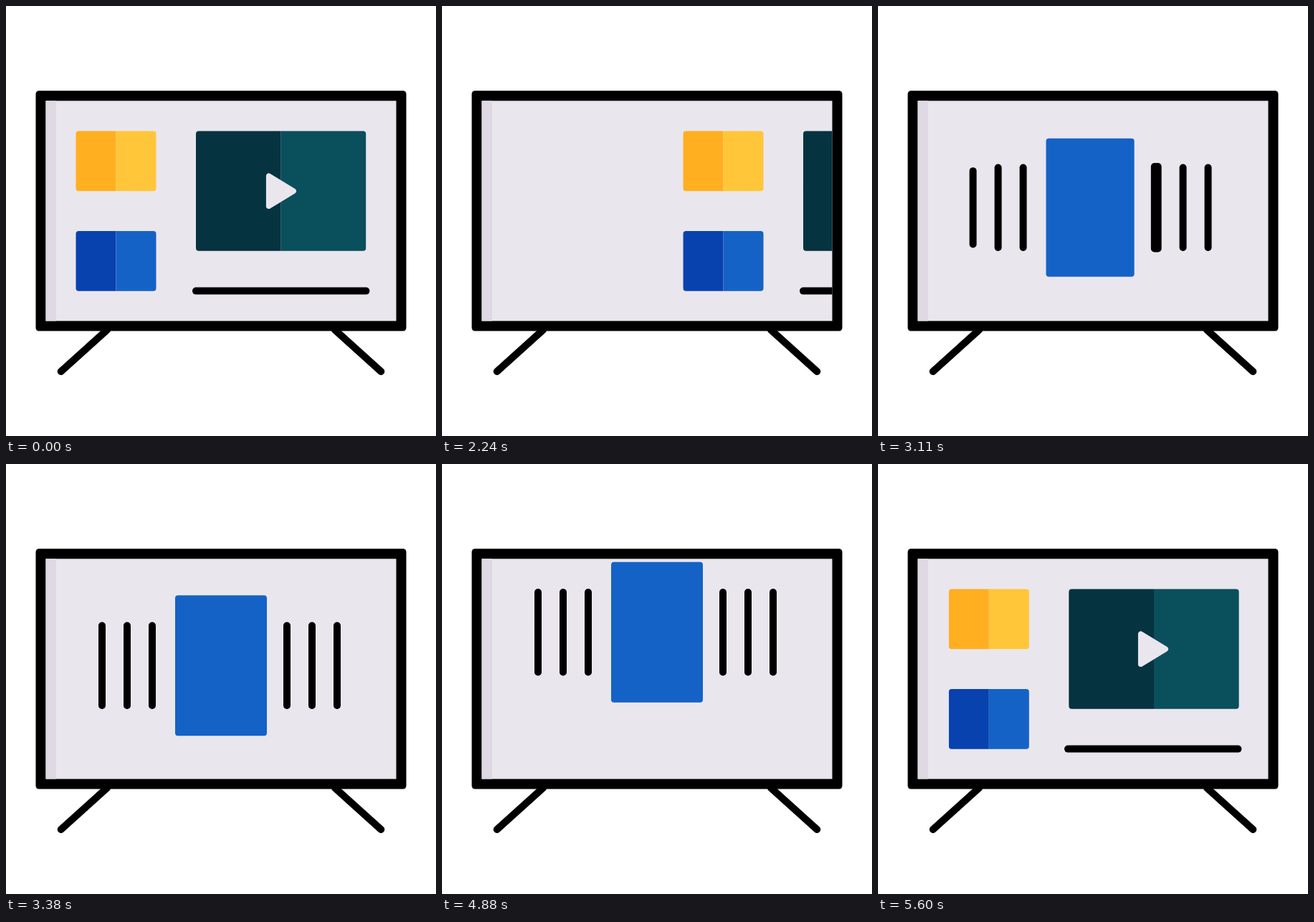
An HTML page that plays this animation: 600x600 px, repeating every 5.63 s.

```html
<!DOCTYPE html>
<html lang="en">
<head>
<meta charset="utf-8">
<title>Television</title>
<style>
html, body { margin: 0; width: 100%; height: 100%; overflow: hidden; background: #fff; }
svg { display: block; width: 100%; height: 100%; }
</style>
</head>
<body>
<svg viewBox="0 0 600 600">
  <defs>
    <clipPath id="screen"><rect x="55.5" y="132" width="489" height="308"/></clipPath>
    <clipPath id="cardShapes">
      <rect x="97.5" y="174.5" width="112" height="83.7" rx="4"/>
      <rect x="97.5" y="314" width="112" height="83.7" rx="4"/>
      <rect x="265" y="174.5" width="237.3" height="167.3" rx="4"/>
    </clipPath>
  </defs>
  <path d="M76.7 510 L141 452 M523.3 510 L459 452" stroke="#000" stroke-width="10" stroke-linecap="round"/>
  <rect x="41.5" y="118.2" width="517" height="335.4" rx="4.5"/>
  <rect x="55.5" y="132.3" width="489" height="307.2" fill="#eae6ee"/>
  <rect x="55.5" y="132.3" width="14.5" height="307.2" fill="#dfd9e4"/>
  <g clip-path="url(#screen)">
    <g id="home">
      <g id="cards"><g clip-path="url(#cardShapes)">
        <path d="M97 174h56.5v85H97z" fill="#ffaf20"/>
        <path d="M153.5 174h56.5v85h-56.5z" fill="#ffc639"/>
        <path d="M97 313h56.5v85H97z" fill="#0842af"/>
        <path d="M153.5 313h56.5v85h-56.5z" fill="#1562c6"/>
        <path d="M264 174h119.7v168H264z" fill="#05333f"/>
        <path d="M383.7 174h119v168h-119z" fill="#0a4f5c"/>
      </g></g>
      <g id="details">
        <path d="M366.7 237.3v42l34.5-21z" fill="#eae6ee" stroke="#eae6ee" stroke-width="7.6" stroke-linejoin="round"/>
        <path d="M265 397.6H502.4" stroke="#000" stroke-width="10" stroke-linecap="round"/>
      </g>
    </g>
    <g id="carousel"></g>
  </g>
</svg>
<script>
const LOOP = 5630;
const MID_Y = 281.3;
const STEP_STARTS = [2560, 3070, 3580];
const STEP_TIME = 308;
const FIRST = -3, LAST = 6;

const byId = id => document.getElementById(id);
const home = byId('home'), cards = byId('cards'), details = byId('details'), carousel = byId('carousel');

const progress = (t, start, end) => Math.min(1, Math.max(0, (t - start) / (end - start)));
const easeInOut = p => (1 - Math.cos(Math.PI * p)) / 2;
const easeOut = p => 1 - (1 - p) ** 3;
const move = (el, x, y) => el.setAttribute('transform', `translate(${x} ${y})`);
const show = (el, on) => el.setAttribute('visibility', on ? 'visible' : 'hidden');

const items = [];
for (let k = FIRST; k <= LAST; k++) {
  const el = document.createElementNS('http://www.w3.org/2000/svg', 'rect');
  carousel.append(el);
  items.push({ el, k, color: k === 0 ? '#ffc639' : '#1562c6' });
}

function slotX(d) {
  if (d < -1) return 204 + 35 * (d + 1);
  if (d > 1) return Math.min(462.5, 392 + 35 * (d - 1));
  return 300 + (d < 0 ? 96 : 92) * d;
}

// d is the signed distance from the centre slot: cards near 0, bars beyond 1.
function placeItem({ el, k, color }, position) {
  const d = k - position;
  const grow = Math.max(0, 1 - Math.abs(d));
  const length = Math.max(0, 1 - 2 * Math.max(0, Math.abs(d) - 3));
  const w = 10 + 118 * grow;
  const h = 10 + 111.5 * length + 74.5 * grow;
  const attrs = {
    x: slotX(d) - w / 2, y: MID_Y - h / 2, width: w, height: h,
    rx: grow > 0.1 ? 4 : 5,
    fill: grow > 0.1 ? color : '#000',
    visibility: d > -3.6 && d < 3.5 ? 'inherit' : 'hidden'
  };
  for (const name in attrs) el.setAttribute(name, attrs[name]);
}

function drawHome(t) {
  let cardX = 0, detailX = 0;
  if (t < 4000) {
    cardX = detailX = 460 * progress(t, 2005, 2331) ** 2;
  } else {
    const enter = easeOut(progress(t, 5110, 5420));
    detailX = -460 * (1 - enter);
    cardX = detailX + 4 * enter * (1 - progress(t, 5420, 5687));
  }
  move(cards, cardX, 0);
  move(details, detailX, 0);
  show(home, t < 2340 || t > 5110);
}

function drawCarousel(t) {
  const position = STEP_STARTS.reduce(
    (sum, start) => sum + easeInOut(progress(t, start, start + STEP_TIME)), 0);
  items.forEach(item => placeItem(item, position));
  const rise = 260 * (1 - easeOut(progress(t, 2240, 2555)));
  const leave = 46.6 * (Math.max(0, t - 4310) / 570) ** 4;
  move(carousel, 0, rise - leave);
  show(carousel, t > 2240 && t < 5200);
}

function draw(now) {
  const time = now % LOOP;
  const t = Math.max(0, Math.floor((time - 20) / 30) * 30 + 20);
  drawHome(t);
  drawCarousel(t);
}

const begin = performance.now();
function tick() {
  draw(performance.now() - begin);
  requestAnimationFrame(tick);
}
tick();
</script>
</body>
</html>
```
